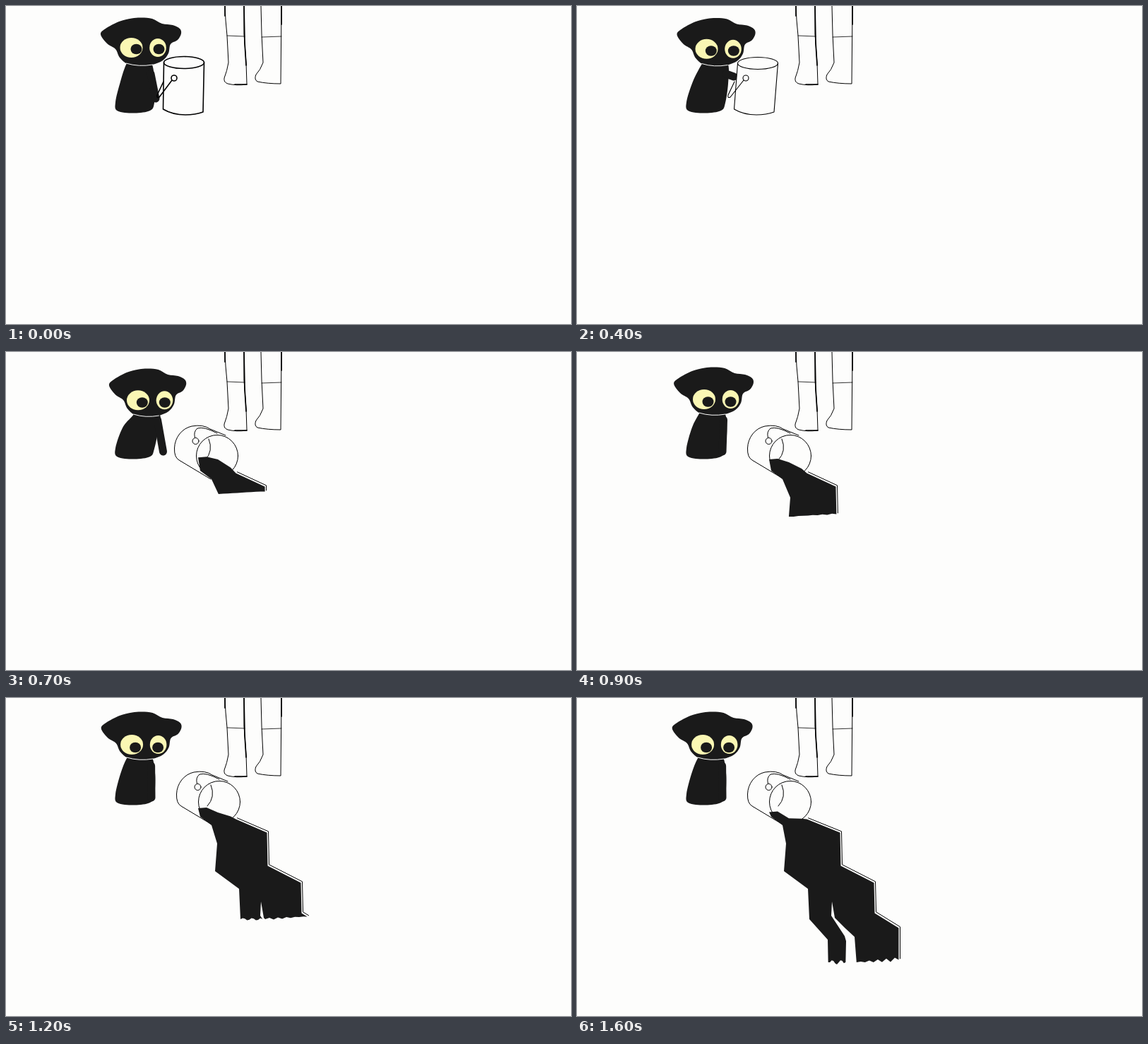
Recreate the animation shown at these times as an HTML page. Size 800x450 px, loop 1700 ms.

```html
<!DOCTYPE html>
<html lang="en">
<head>
<meta charset="utf-8">
<title>Cat and bucket</title>
<style>
  html, body { margin: 0; width: 100%; height: 100%; overflow: hidden; background: #fdfdfc; }
  svg { display: block; width: 100vw; height: 100vh; }
  .line { fill: none; stroke: #000; stroke-width: 1; stroke-linecap: round; stroke-linejoin: round; }
  .ink { fill: #1a1a1a; }
  .arm { stroke: #1a1a1a; stroke-width: 11; stroke-linecap: round; }
  .paper { fill: #fdfdfc; stroke: none; }
  .neck { fill: none; stroke: #fdfdfc; }
  .eye { fill: #faf7b4; }
</style>
</head>
<body>
<svg viewBox="0 0 800 450">
  <g class="line">
    <path d="M310,0 L311,20 L313,42 L315,80 Q313,92 309,102 Q308,108 314,110 Q326,113 341,111 L340,80 L337,40 V0"/>
    <path d="M361,0 L362,40 L364,80 Q360,91 354,97 Q351,104 356,107 Q370,110 389,110 L390,0"/>
    <path stroke-width=".8" d="M313,42 L338,43 M362,44 L390,43"/>
    <path stroke-width="1.7" d="M337,0 L338,52 L340,84 M310,0 V14 M390,0 V26 M324,111 L341,111"/>
  </g>
  <g id="cat"></g>
  <g id="bucket"></g>
  <g id="spill"></g>
</svg>
<script>
const STEP = 100, STEPS = 17;
const $ = id => document.getElementById(id);
const parse = s => s.split(' ').map(p => p.split(',').map(Number));
const mix = (a, b, t) => a + (b - a) * t;

// Linear value between keys of the form [step, value]
function tween(keys, s) {
  const i = keys.findIndex(k => k[0] > s);
  if (i < 0) return keys[keys.length - 1][1];
  const [a, b] = [keys[i - 1], keys[i]];
  return mix(a[1], b[1], (s - a[0]) / (b[0] - a[0]));
}

// Closed Catmull-Rom curve through the points
function blob(p) {
  const n = p.length, at = i => p[(i + n) % n];
  return p.reduce((d, b, i) => {
    const [a, c, e] = [at(i - 1), at(i + 1), at(i + 2)];
    return d + `C${b.map((v, k) => v + (c[k] - a[k]) / 6)} ${c.map((v, k) => v - (e[k] - b[k]) / 6)} ${c}`;
  }, 'M' + p[0]) + 'Z';
}

const ellipse = (x, y, rx, ry, cls) =>
  `<ellipse class="${cls}" cx="${x}" cy="${y}" rx="${rx}" ry="${ry}"/>`;

const HEAD = blob(parse('134,40 141,32 160,22 178,17.5 192,16.5 207,18 221,25 236,27 246,32 248,39 243,48 233,54 230,67 222,77 207,83 190,84.5 172,82 161,73 155,61 143,53'));

const HEAD_X = [[0, 0], [1, 1.5], [4, 6], [7, 9.5], [9, 2.5], [12, .6], [14, 1.6], [16, .6]];
const HEAD_Y = [[0, 0], [1, -1], [4, .5], [7, 7], [9, 5], [12, 3]];
const HAND_X = [[0, 212], [1, 212], [4, 222], [7, 222.5], [9, 206]];
const HAND_Y = [[0, 131], [1, 131], [4, 100], [6, 141]];

function drawCat(step) {
  const s = step < 4 ? Math.min(step, 1) : step;
  const x = tween(HEAD_X, s), y = tween(HEAD_Y, s);
  const look = Math.min(s / 12, 1);
  const body = blob([
    [178 + x, 72 + y], [170 + x, 83 + y], [162 + x / 3, 107], [155, 136], [158, 148.5], [182, 151.5],
    [204, 148], [210, 137], [211 + x / 2, 110], [207 + x * 1.2, 83 + y], [198 + x, 72 + y]
  ]);
  const eye = (cx, rx, ry, gaze) => {
    const ex = cx + x + 1, ey = 59 + y + 4 * look;
    return ellipse(ex, ey, rx, ry, 'eye') + ellipse(ex + gaze - 2 * look, ey + 2 + 2 * look, 8, 7.3, 'ink');
  };
  return `<path class="ink" d="${body}"/>
    <path class="arm" d="M${205 + x},96 L${tween(HAND_X, s)},${tween(HAND_Y, s)}"/>
    <g transform="translate(${191 + x} ${y}) scale(${1 - x * .0045} 1) translate(-191)">
      <path class="ink" d="${HEAD}"/>
      <path class="neck" d="M170,81 Q188,86.5 208,83"/>
    </g>` + eye(176.5, 16, 14, 7) + eye(214, 11.8, 13, 1.5);
}

function upright(lean) {
  const x = 252 + lean, y = 80 + lean / 4, ring = 238 + lean / 4;
  const sides = `M${x - 28.5},${y} L222.5,146 Q236,154 254,154 Q268,154 279,150 L${x + 28.5},${y}`;
  return `<path class="paper" d="${sides} Q${x},${y - 16} ${x - 28.5},${y}"/>
    <path d="${sides}"/>${ellipse(x, y, 28.5, 8.5, '')}
    <path d="M${ring - 3},105 L217,129 Q213,131 214,126 L223,107"/><circle cx="${ring}" cy="102" r="4"/>`;
}

const TIPPED = 'M293,180 L248,153 Q241,149 241.5,136 C242,121 252,108 266,105 Q282,102 292,109 L314,118';

function drawBucket(step) {
  if (step < 7) {
    const k = Math.max(0, step - 4);
    return `<g class="line" style="stroke-width:${step < 4 ? 1.6 : 1.1}"
      transform="translate(${5 * k} ${11 * k}) rotate(${31 * k} 256 114)">${upright(step < 4 ? 0 : 4)}</g>`;
  }
  return `<g class="line" transform="translate(${Math.min(0, (step - 9) * 1.5)})">
    <path class="paper" d="${TIPPED}"/><path d="${TIPPED}"/>
    <circle class="paper" cx="302" cy="147" r="29.5"/><circle cx="302" cy="147" r="29.5"/>
    <path d="M290,123 Q297,140 285,153 M270.5,121 Q268,113 274,108 Q283,105 302,115"/>
    <circle cx="271.5" cy="126" r="4.5"/>
  </g>`;
}

// Edges of the fully poured paint, all downwards
const RIGHT = parse('326,171 372,190 373,237 420,261 421,304 455,325 455,390');
const LEFT = parse('275,168 291,180 297,206 294,245 328,270 330,313 356,342 357,390');
const GAP_RIGHT = parse('361,288 365,311 380,326 393,338 397,390');
const GAP_LEFT = parse('361,288 360,308 379,337 381,344 380,390');

const FRONT = [[7, 201], [9, 233], [12, 313], [14, 350], [16, 374]];
const SPREAD = [[7, -5], [9, -5], [12, -2], [16, 1]];

// Part of a line above the given height
function cut(line, y) {
  const n = line.findIndex(p => p[1] > y);
  if (n < 1) return [];
  const [a, b] = [line[n - 1], line[n]];
  return [...line.slice(0, n), [mix(a[0], b[0], (y - a[1]) / (b[1] - a[1])), y]];
}

// Uneven lower edge between two points
function drips(a, b, size) {
  return Array.from({ length: 9 }, (_, i) => {
    const t = (i + 1) / 10, x = mix(a[0], b[0], t);
    return [x, mix(a[1], b[1], t) + size * Math.sin(x * .5)];
  });
}

function drawSpill(step) {
  if (step < 7) return '';
  const front = tween(FRONT, step), spread = tween(SPREAD, step);
  const drop = (step - 9) * 1.35, size = (step - 7) / 3;
  const widen = (line, by) => line.map(([x, y]) => [y > 185 ? x + by : x, y]);
  const top = [[272, 152 + drop], [284, 151 + drop], [300, 156 + drop * 1.5], [318, 165 + drop * .6]];
  const right = widen(cut(RIGHT, front - 4), spread);
  const left = widen(cut(LEFT, front), -spread).reverse();
  const gap = [cut(GAP_RIGHT, front).reverse(), cut(GAP_LEFT, front)];
  const end = right[right.length - 1];
  const edge = gap[0].length
    ? [...drips(end, gap[0][0], size), ...gap[0], ...gap[1], ...drips(gap[1][gap[1].length - 1], left[0], size)]
    : drips(end, left[0], size);
  const shift = (line, dx, dy) => line.map(([x, y]) => [x + dx, y + dy]);
  return `<polygon class="ink" points="${[...top, ...shift(right, -.5, .5), ...edge, ...left].join(' ')}"/>
    <polyline class="line" points="${shift(right, 1.5, -1.2).join(' ')}"/>`;
}

let shown = -1;
function render() {
  const step = Math.floor(performance.now() / STEP) % STEPS;
  if (step !== shown) {
    shown = step;
    $('cat').innerHTML = drawCat(step);
    $('bucket').innerHTML = drawBucket(step);
    $('spill').innerHTML = drawSpill(step);
  }
  requestAnimationFrame(render);
}
render();
</script>
</body>
</html>
```
